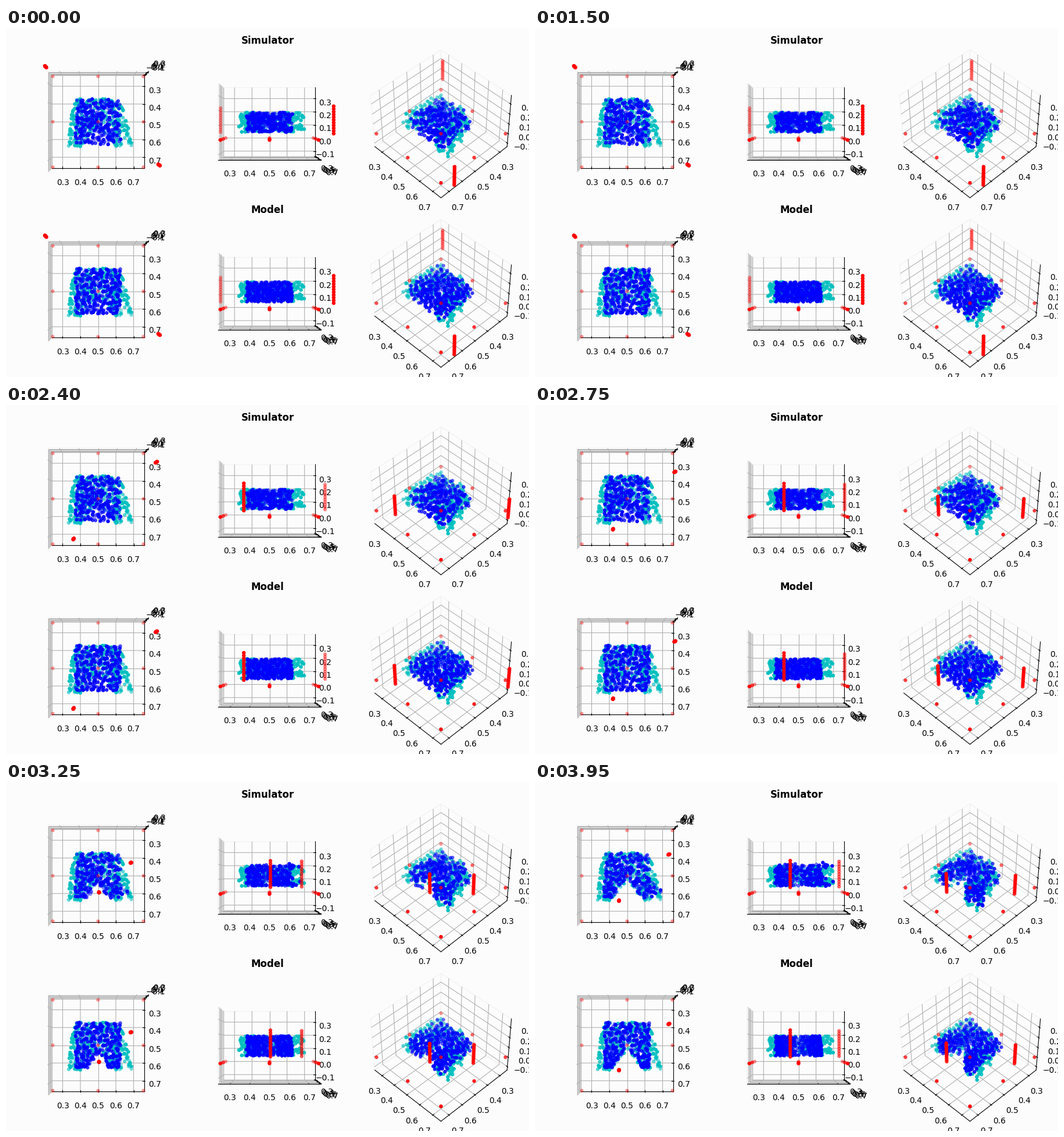
A matplotlib script for the animation above (4000 ms loop, 900x600 px).

```python
import numpy as np
import matplotlib.pyplot as plt
from matplotlib.animation import FuncAnimation
from matplotlib.collections import LineCollection
from matplotlib.lines import Line2D
from matplotlib.patches import Rectangle

FRAMES, INTERVAL = 80, 50
BG = "#fcfcfc"
SIDE = 258.0                       # panel size in pixels
SCALE, DIST = SIDE / 0.185, 10.0
UNIT = 16 / 7                      # view units per data unit
CENTER = np.array([0.5, 0.5, 0.1235])
STRETCH = np.array([UNIT, -UNIT, 0.75 * UNIT])
HALF = np.array([0.5952, 0.5952, 0.4464])
DELTA = np.array([0.0952, 0.0952, 0.0714])
COLS = (158.5, 453.5, 748.5)
ROWS = (161.2, 452.6)
VIEWS = ((90, -90), (0, -90), (45, -45))
GRIP_START, CLOSE_STEPS = 40, 30

fig = plt.figure(figsize=(9, 6), dpi=100, facecolor=BG)
ax = fig.add_axes([0, 0, 1, 1])
ax.set_xlim(0, 900)
ax.set_ylim(600, 0)
ax.axis("off")


class View:
    """Perspective camera of one panel."""

    def __init__(self, cx, cy, elev, azim):
        self.cx, self.cy = cx, cy
        e, a = np.radians([elev, azim])
        ce, se, ca, sa = np.cos(e), np.sin(e), np.cos(a), np.sin(a)
        self.eye = np.array([ce * ca, ce * sa, se])
        self.right = np.array([-sa, ca, 0])
        self.up = np.array([-se * ca, -se * sa, ce])

    def project(self, pts):
        pts = np.asarray(pts, float)
        depth = DIST - pts @ self.eye
        x = self.cx + SCALE * (pts @ self.right) / depth
        y = self.cy - SCALE * (pts @ self.up) / depth
        return np.stack([x, y], -1), depth


def to_box(data):
    return (data - CENTER) * STRETCH


def with_coord(p, axis, value):
    q = np.array(p, float)
    q[axis] = value
    return q


BACK = HALF * [-1, 1, -1]
# Edge that carries each axis, and the directions pointing away from the box.
EDGES = (HALF * [0, -1, -1], HALF * [1, 0, -1], HALF * [1, 1, 0])
TICK_DIR = (1, 0, 0)
TICKS = ((0.3, 0.4, 0.5, 0.6, 0.7),) * 2 + ((-0.1, 0.0, 0.1, 0.2, 0.3),)


def draw_box(view):
    panes, grid, black = [], [], []
    for i in range(3):
        j, k = (i + 1) % 3, (i + 2) % 3
        corners = []
        for a, b in ((-1, -1), (-1, 1), (1, 1), (1, -1), (-1, -1)):
            p = with_coord(BACK, j, a * HALF[j])
            corners.append(with_coord(p, k, b * HALF[k]))
        panes.append(view.project(corners)[0])

        edge = EDGES[i]
        ends = [with_coord(edge, i, s * HALF[i]) for s in (-1, 1)]
        black.append(view.project(ends)[0])
        out = np.sign(edge)
        for t in TICKS[i]:
            v = (t - CENTER[i]) * STRETCH[i]
            corner = with_coord(BACK, i, v)
            line = [with_coord(corner, j, -BACK[j]), corner,
                    with_coord(corner, k, -BACK[k])]
            grid.append(view.project(line)[0])

            base = with_coord(edge, i, v)
            d = TICK_DIR[i]
            tick = [with_coord(base, d, base[d] + f * out[d] * DELTA[d])
                    for f in (0.1, -0.2)]
            black.append(view.project(tick)[0])

            (x, y), _ = view.project(base + 1.486 * out * DELTA)
            ax.text(x, y, f"{t:.1f}".replace("-", "\u2212"),
                    fontsize=10, ha="center", va="top", zorder=3)
    for lines, color, width, z in ((panes, "#f3f3f3", 1.0, 0),
                                   (grid, "#b0b0b0", 0.8, 1)):
        ax.add_collection(LineCollection(lines, colors=color,
                                         linewidths=width, zorder=z),
                          autolim=False)
    for line in black:
        ax.add_line(Line2D(*line.T, color="black", linewidth=0.8, zorder=2))


class Cloud:
    """Dots of one colour whose opacity fades with depth."""

    def __init__(self, view, color, zorder):
        self.view, self.color = view, color
        self.dots = ax.scatter([], [], s=10, linewidths=1.5, zorder=zorder)
        x0 = view.cx - 3.5 - SIDE / 2
        y0 = view.cy + 3.5 - SIDE / 2
        self.dots.set_clip_path(Rectangle((x0, y0), SIDE, SIDE,
                                          transform=ax.transData))

    def show(self, data):
        xy, depth = self.view.project(to_box(data))
        order = np.argsort(-depth)
        near = -1 / depth[order]
        span = max(np.ptp(near), 1e-9)
        rgba = np.empty((len(data), 4))
        rgba[:, :3] = self.color
        rgba[:, 3] = 1 - 0.7 * (near - near.min()) / span
        self.dots.set_offsets(xy[order])
        self.dots.set_facecolor(rgba)
        self.dots.set_edgecolor(rgba)


def notch(p, s, left, right):
    """Press a wedge into the front side; left/right: how far each leg is squeezed."""
    q = p.copy()
    if s <= 0:
        return q
    d = p[:, 0] - 0.5
    depth = 0.11 * s
    w = 0.08 * s * np.clip((p[:, 1] - 0.62 + depth) / depth, 0, 1.1)
    c = np.where(d < 0, left, right)
    q[:, 0] = 0.5 + np.sign(d) * (w + np.abs(d) * (1 - c * w / 0.122))
    q[:, 1] -= 0.3 * w * (1 - c) * np.abs(d) / 0.122
    return q


def spread(rng, count, tries=12):
    """Evenly spaced random points in the unit cube."""
    pts = rng.random((1, 3))
    while len(pts) < count:
        new = rng.random((tries, 3))
        gap = ((new[:, None] - pts) ** 2).sum(-1).min(1)
        pts = np.vstack([pts, new[gap.argmax()]])
    return pts


rng = np.random.default_rng(7)
LOW = np.array([0.378, 0.378, 0.050])
SIZE = np.array([0.243, 0.243, 0.139])

sim0 = LOW + SIZE * rng.random((290, 3))
lift = rng.random(290)
phase = rng.uniform(0, 2 * np.pi, (290, 3))
model0 = LOW + SIZE * spread(rng, 320)

# Two splayed legs joined at the far side.
f, side, r = rng.random((3, 300))
gap = 0.09 * np.clip((f - 0.58) / 0.42, 0, 1)
reach = np.where(side < 0.5, 0.11 + 0.055 * f ** 0.5, 0.105 + 0.08 * f ** 0.7)
goal = np.column_stack([
    0.5 + np.where(side < 0.5, -1, 1) * (gap + r * (reach - gap)),
    0.376 + 0.256 * f,
    LOW[2] + SIZE[2] * rng.random(300)])

floor = np.array([(x, y, 0) for x in (0.25, 0.5, 0.75)
                  for y in (0.25, 0.5, 0.75)])
heights = np.linspace(0.043, 0.229, 11)


def finger(x, y):
    return np.column_stack([np.full(11, x), np.full(11, y), heights])


def gripper(k):
    if k < GRIP_START:
        tips = (0.2178, 0.2042), (0.828, 0.732)
    else:
        n = k - GRIP_START
        last = CLOSE_STEPS - 1
        n = n if n <= last else 2 * last - n
        dx, dy = 0.00805 * n, 0.00744 * n
        tips = (0.8776 - dx, 0.2441 + dy), (0.3036 + dx, 0.7752 - dy)
    return np.vstack([floor] + [finger(*t) for t in tips])


def simulator(k, s):
    p = notch(sim0, s, 0.95, 0.05)
    up = np.clip(p[:, 2] - 0.12, 0, None)
    p[:, 2] += up * 0.5 * s * lift
    return p + 0.0006 * np.sin(2 * np.pi * k / FRAMES + phase)


def model(k, s):
    return notch(model0, s, 1.0, 0.95)


panels = []
for title, cy, shape in zip(("Simulator", "Model"), ROWS, (simulator, model)):
    ax.text(450, cy - 134.2, title, fontsize=12, fontweight="bold",
            ha="center", va="baseline")
    for cx, angles in zip(COLS, VIEWS):
        view = View(cx, cy, *angles)
        draw_box(view)
        Cloud(view, (0, 0.75, 0.75), 4).show(goal)
        panels.append((shape, Cloud(view, (0, 0, 1), 5),
                       Cloud(view, (1, 0, 0), 6)))


def update(k):
    s = np.clip((k - 59) / 10, 0, 1) ** 0.7
    tool = gripper(k)
    for shape, body, grip in panels:
        body.show(shape(k, s))
        grip.show(tool)
    return []


anim = FuncAnimation(fig, update, frames=FRAMES, interval=INTERVAL,
                     init_func=lambda: update(0), repeat=True,
                     repeat_delay=0, blit=False)
plt.show()
```
